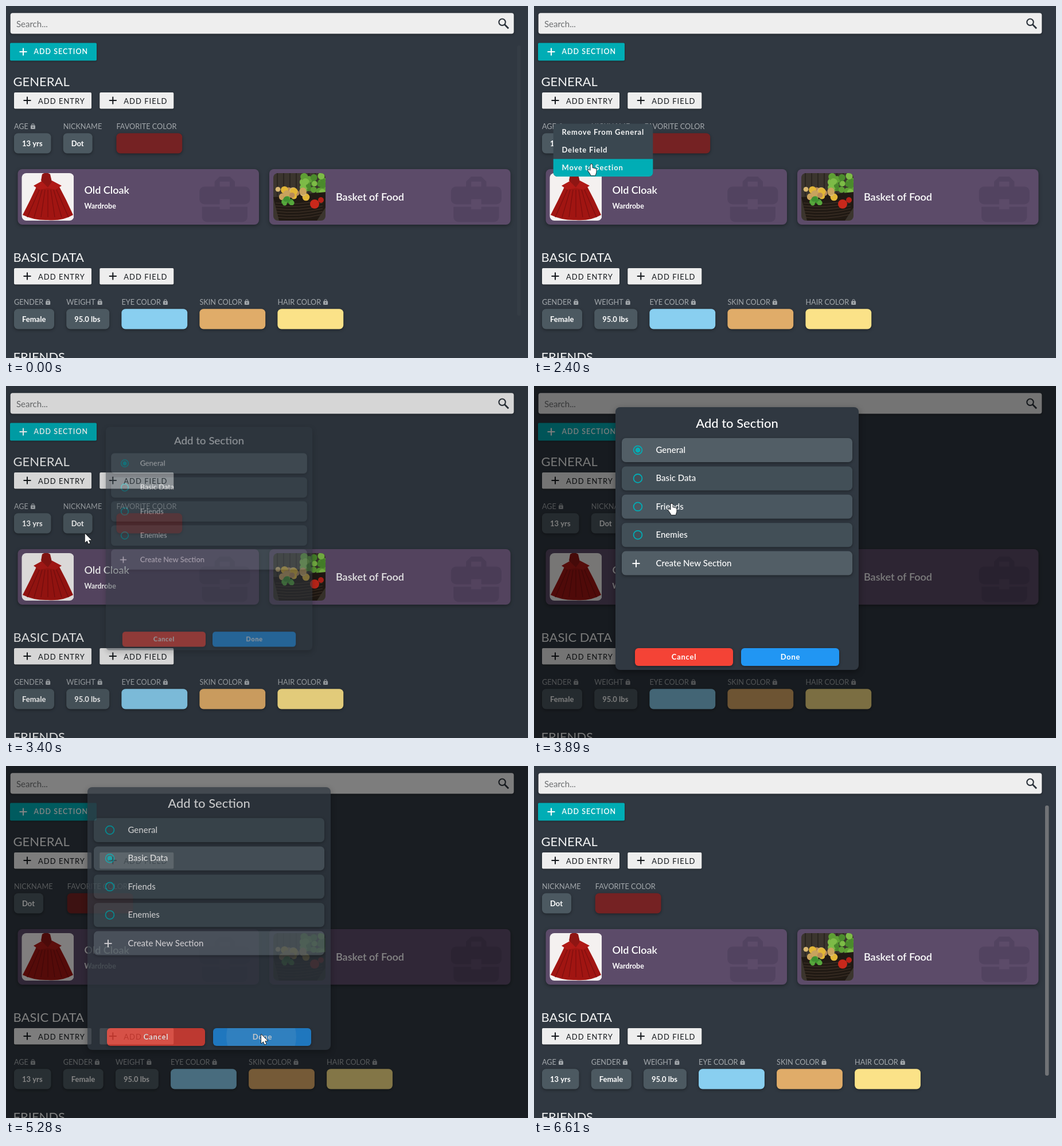
These frames come from a looping animation (910x615 px, 7.08 s). An HTML page with a canvas:

```html
<!DOCTYPE html>
<html lang="en">
<head>
<meta charset="utf-8">
<title>Move a field to another section</title>
<style>
  html, body { margin: 0; width: 100%; height: 100%; overflow: hidden; background: #303841; }
  canvas { display: block; }
</style>
</head>
<body>
<canvas id="stage" width="910" height="615"></canvas>
<script>
const W = 910, H = 615, LOOP = 7080, TICK = 77.6;
const BG = '#303841', TEAL = '#00adb5', LIGHT = '#eeeeee', INK = '#14181c', GREY = '#a3a8ac';
const stage = document.getElementById('stage').getContext('2d');
const layer = document.createElement('canvas');
layer.width = W;
layer.height = H;
const sheet = layer.getContext('2d');
let c = stage;

const CASE = new Path2D('M10 16v-1H3v4c0 1.1.9 2 2 2h14c1.1 0 2-.9 2-2v-4h-7v1zM20 7h-4V5l-2-2h-4L8 5v2H4c-1.1 0-2 .9-2 2v3c0 1.1.9 2 2 2h6v-2h4v2h6c1.1 0 2-.9 2-2V9c0-1.1-.9-2-2-2zM14 7h-4V5h4z');
const ARROW = new Path2D('M0 0V15.5L3.6 12.2 6 17.6 8.6 16.5 6.2 11.2H11.2Z');
const HAND = new Path2D('M5 11.5V2a1.6 1.6 0 0 1 3.2 0v5.2l4.6.9c1.6.3 2.2 1.2 2.2 2.6V14c0 2.4-1.4 3.4-1.6 6H5.8C5.2 17.6 2.6 15 .9 12.2c-.8-1.4 1-2.6 2.2-1.5z');

const value = (label, text, w, locked = true) => ({ label, text, w, locked });
const swatch = (label, color, locked = true) => ({ label, color, w: 114.8, locked });
const AGE = value('AGE', '13 yrs', 64.5);
const GENERAL = [value('NICKNAME', 'Dot', 51, false), swatch('FAVORITE COLOR', '#752223', false)];
const BASIC = [
  value('GENDER', 'Female', 70), value('WEIGHT', '95.0 lbs', 75),
  swatch('EYE COLOR', '#89cff0'), swatch('SKIN COLOR', '#e0ac69'), swatch('HAIR COLOR', '#fbe288')
];
const MENU = ['Remove From General', 'Delete Field', 'Move to Section'];
const OPTIONS = ['General', 'Basic Data', 'Friends', 'Enemies', 'Create New Section'];

const easeOut = p => p * (2 - p);
const easeIn = p => p ** 3;
const steady = p => p;
const ramp = (t, a, b) => Math.max(0, Math.min(1, (t - a) / (b - a)));

// Pointer moves: begin, end, x, y, easing
const START = { x: 678, y: 587 };
const MOVES = [
  [77, 776, 48, 239, easeOut], [776, 1242, 35, 207, steady],
  [1862, 2483, 101, 277, easeOut], [3337, 3880, 240, 205, easeOut],
  [3880, 4113, 234, 168, easeOut], [4346, 5040, 445, 469, easeOut],
  [5277, 5742, 524, 501, easeIn], [5742, 6365, 892, 621, steady]
];

function pointerAt(t) {
  let { x, y } = START;
  for (const [a, b, toX, toY, ease] of MOVES) {
    const p = ease(ramp(t, a, b));
    x += (toX - x) * p;
    y += (toY - y) * p;
  }
  return { x, y };
}

function seeded(seed) {
  return () => (seed = seed * 16807 % 2147483647) / 2147483647;
}

function box(x, y, w, h, r, fill, shadow = 0) {
  c.save();
  if (shadow) {
    c.shadowColor = 'rgba(0,0,0,.38)';
    c.shadowBlur = shadow;
    c.shadowOffsetY = shadow / 3;
  }
  c.fillStyle = fill;
  c.beginPath();
  c.roundRect(x, y, w, h, r);
  c.fill();
  c.restore();
}

function text(s, x, y, size, weight = 400, color = '#fff', spacing = 0, align = 'left') {
  c.font = `${weight} ${size}px Lato, "Open Sans", sans-serif`;
  c.letterSpacing = spacing + 'px';
  c.textAlign = align;
  c.fillStyle = color;
  c.fillText(s, x, y);
  return c.measureText(s).width;
}

function disc(x, y, r, fill) {
  c.fillStyle = fill;
  c.beginPath();
  c.arc(x, y, r, 0, 7);
  c.fill();
}

function ring(x, y, r, color, width, from = 0, to = 7) {
  c.strokeStyle = color;
  c.lineWidth = width;
  c.beginPath();
  c.arc(x, y, r, from, to);
  c.stroke();
}

function curve(x0, y0, cx, cy, x1, y1) {
  c.beginPath();
  c.moveTo(x0, y0);
  c.quadraticCurveTo(cx, cy, x1, y1);
  c.stroke();
}

function shape(d, fill) {
  c.fillStyle = fill;
  c.fill(new Path2D(d));
}

function plus(x, y, color) {
  c.fillStyle = color;
  c.fillRect(x - 6.5, y - 1, 13, 2);
  c.fillRect(x - 1, y - 6.5, 2, 13);
}

function lock(x, y) {
  ring(x + 4, y + 3, 2, GREY, 1.1, Math.PI, 0);
  c.fillStyle = GREY;
  c.fillRect(x + 1.5, y + 3, 1, 2);
  c.fillRect(x + 5.5, y + 3, 1, 2);
  box(x, y + 3.8, 8, 6.5, 1, GREY);
  disc(x + 4, y + 7, 1, BG);
}

function clipped(x, y, w, h, r, draw) {
  c.save();
  c.beginPath();
  c.roundRect(x, y, w, h, r);
  c.clip();
  draw();
  c.restore();
}

function button(label, x, y, w) {
  box(x, y, w, 28.4, 2, LIGHT, 3);
  plus(x + 23, y + 14, INK);
  text(label, x + 42, y + 19.5, 13, 400, INK, 1);
}

function section(title, y, fields) {
  text(title, 12.5, y + 139.7, 22, 400, '#f2f3f3');
  button('ADD ENTRY', 14, y + 151, 135);
  button('ADD FIELD', 163.3, y + 151, 129);
  let x = 14;
  for (const f of fields) {
    let labelW = text(f.label, x, y + 214.5, 12.7, 400, GREY);
    if (f.locked) {
      lock(x + labelW + 4, y + 204.8);
      labelW += 12;
    }
    box(x, y + 222.2, f.w, 35.3, 7, f.color || '#4c5961', 5);
    if (f.text) text(f.text, x + 14, y + 244.5, 13, 700);
    x += Math.max(f.w, labelW + 4) + 21.2;
  }
}

function cloak() {
  c.fillStyle = '#f4f1f0';
  c.fillRect(27, 292, 91, 83);
  shape('M54 314Q42 340 29 365Q50 375 73 374Q98 376 117 365Q105 338 92 314Z', '#a11512');
  shape('M48 314L64 305 73 316 80 305 97 314 86 321 73 318 58 321Z', '#b01a17');
  shape('M63 294Q70 289 77 294L80 307 73 317 61 305Z', '#8f1513');
  c.strokeStyle = '#7d0e0e';
  c.lineWidth = 1.2;
  for (let i = -3; i <= 3; i++) curve(73 + i * 5, 321, 73 + i * 8, 342, 73 + i * 12, 369);
}

function basket() {
  const rnd = seeded(11);
  const heap = (n, x, y, w, h, r, colors) => {
    for (let i = 0; i < n; i++) {
      disc(x + w * rnd(), y + h * rnd(), r * (.6 + .4 * rnd()), colors[i % colors.length]);
    }
  };
  c.fillStyle = '#3b352e';
  c.fillRect(466, 292, 91, 83);
  c.fillStyle = '#2a2520';
  for (let x = 472; x < 556; x += 11) c.fillRect(x, 292, 2, 40);
  heap(26, 518, 297, 36, 28, 7, ['#5f9f35', '#7dbb47', '#4b8a2c']);
  shape('M466 334L557 325V352L542 375H476Z', '#211a14');
  c.strokeStyle = '#43352a';
  c.lineWidth = 1;
  for (let y = 344; y < 374; y += 5) curve(470, y, 510, y + 5, 552, y - 5);
  heap(18, 474, 320, 50, 14, 7, ['#c9a35d', '#b98b58', '#d9b873', '#e2b637']);
  heap(12, 482, 335, 18, 13, 5, ['#3f9130', '#56a83c']);
  disc(538, 346, 8, '#c9281b');
  disc(549, 339, 5, '#b62218');
}

function card(x, picture) {
  box(x, 285, 420.5, 97, 8, '#5c4b69', 6);
  c.save();
  c.translate(x + 308, 284.8);
  c.scale(4.4, 4.4);
  c.fillStyle = '#524360';
  c.fill(CASE, 'evenodd');
  c.restore();
  clipped(x + 7, 292, 91, 83, 8, picture);
}

function page(moved) {
  c.fillStyle = BG;
  c.fillRect(0, 0, W, H);
  box(7.7, 12.3, 877.6, 36.2, 4, LIGHT, 4);
  text('Search...', 18, 36.5, 15, 400, '#6d6f71');
  ring(865, 28.2, 5.7, '#2b323a', 2.1);
  c.lineWidth = 2.8;
  curve(869.4, 32.6, 872, 35.2, 876, 39.2);

  box(7, 64.4, 151, 31, 2, TEAL, 3);
  plus(30, 80, '#fff');
  text('ADD SECTION', 48.5, 84, 12.5, 600, '#fff', 1);

  section('GENERAL', 0, moved ? GENERAL : [AGE, ...GENERAL]);
  card(20.5, cloak);
  text('Old Cloak', 136.5, 328, 18, 600);
  text('Wardrobe', 136.5, 353.5, 12.4, 700);
  card(459, basket);
  text('Basket of Food', 575, 340, 18, 600);
  section('BASIC DATA', 307, moved ? [AGE, ...BASIC] : BASIC);
  text('FRIENDS', 12.5, 620.7, 22, 400, '#f2f3f3');
}

function menu(t, y) {
  const hot = t > 1900 ? Math.min(2, Math.floor((y - 206) / 30.7)) : -1;
  clipped(33.7, 205.7, 173.6, 92.4, 7, () => {
    c.fillStyle = '#3a4750';
    c.fillRect(33, 205, 175, 94);
    c.fillStyle = TEAL;
    if (hot >= 0) c.fillRect(33, 205.7 + hot * 30.8, 175, 30.8);
  });
  MENU.forEach((s, i) => text(s, 48.5, 225.3 + i * 31, 13, 700, '#f4f5f5', .82));
}

// Index of the dialog row under a point, or -1
function rowAt(x, y) {
  const i = Math.floor((y - 91) / 49.4);
  return x > 153 && x < 555 && i >= 0 && i < 5 && (y - 91) % 49.4 < 42 ? i : -1;
}

const onDone = (x, y) => x > 361 && x < 532 && y > 458 && y < 489;

function dialog(t, x, y) {
  const picked = t < 4180 ? 0 : 1;
  const hot = t < 5200 ? rowAt(x, y) : -1;
  box(142, 37, 424, 459, 8, BG, 12);
  text('Add to Section', 354, 73, 22, 500, '#fff', 0, 'center');
  OPTIONS.forEach((s, i) => {
    const top = 91 + i * 49.4, mid = top + 21;
    const fill = i === picked || i === 4 ? '#525e66' : i === hot ? '#4a5760' : '#424f57';
    box(153, top, 402, 42, 7, fill, 5);
    text(s, 212.5, mid + 5, 15, 500);
    if (i === 4) return plus(178, mid + .5, '#fff');
    ring(181, mid, 7.4, TEAL, 1.8);
    if (i === picked) disc(181, mid, 4.4, TEAL);
  });
  const wave = ramp(t, 4180, 4580);
  disc(181, 161.4, 20 * Math.min(1, wave * 2), `rgba(0,173,181,${.25 * (1 - wave)})`);

  box(176, 458, 171, 31, 6, '#f44336', 5);
  box(361, 458, 171, 31, 6, '#2196f3', 5);
  const push = Math.max(0, t - 5090) / 187;
  clipped(361, 458, 171, 31, 6, () => disc(445, 473, 61 * push, 'rgba(255,255,255,.1)'));
  text('Cancel', 261.5, 477.7, 13, 700, '#fff', .75, 'center');
  text('Done', 447, 477.7, 13, 700, '#fff', .75, 'center');
}

function pointer(t, x, y) {
  if (t < 70 || t > 6330) return;
  const hand = (t > 1050 && t < 3400) ||
    (t > 3480 && t < 5240 && (rowAt(x, y) >= 0 || onDone(x, y)));
  const path = hand ? HAND : ARROW;
  c.save();
  c.translate(hand ? x - 6.5 : x, y);
  c.lineWidth = 1.6;
  c.lineJoin = 'round';
  c.strokeStyle = '#15181b';
  c.fillStyle = '#fff';
  c.stroke(path);
  c.fill(path);
  c.restore();
}

function draw(t) {
  const { x, y } = pointerAt(t);
  page(t > 5250);
  const bar = t < 70 ? .08 : ramp(t, 6208, 6500);
  box(891, 69, 6.5, 472, 3, `rgba(113,115,118,${bar})`);
  if (t > 1380 && t < 3400) menu(t, y);

  const closing = ramp(t, 5199, 5510);
  const shade = .51 * ramp(t, 3337, 3725) * (1 - closing ** 2);
  c.fillStyle = `rgba(0,0,0,${shade})`;
  c.fillRect(0, 0, W, H);

  const opening = ramp(t, 3337, 3492);
  if (opening > 0 && closing < 1) {
    c = sheet;
    c.clearRect(0, 0, W, H);
    dialog(t, x, y);
    c = stage;
    const zoom = .7 + .3 * opening;
    c.save();
    c.globalAlpha = opening * (1 - closing);
    c.translate(354, 266.5);
    c.scale(zoom, zoom);
    c.drawImage(layer, -354, -266.5);
    c.restore();
  }
  pointer(t, x, y);
}

function loop(now) {
  // The screen updates in even ticks
  draw(Math.floor((now % LOOP + 19) / TICK) * TICK);
  requestAnimationFrame(loop);
}
requestAnimationFrame(loop);
</script>
</body>
</html>
```
